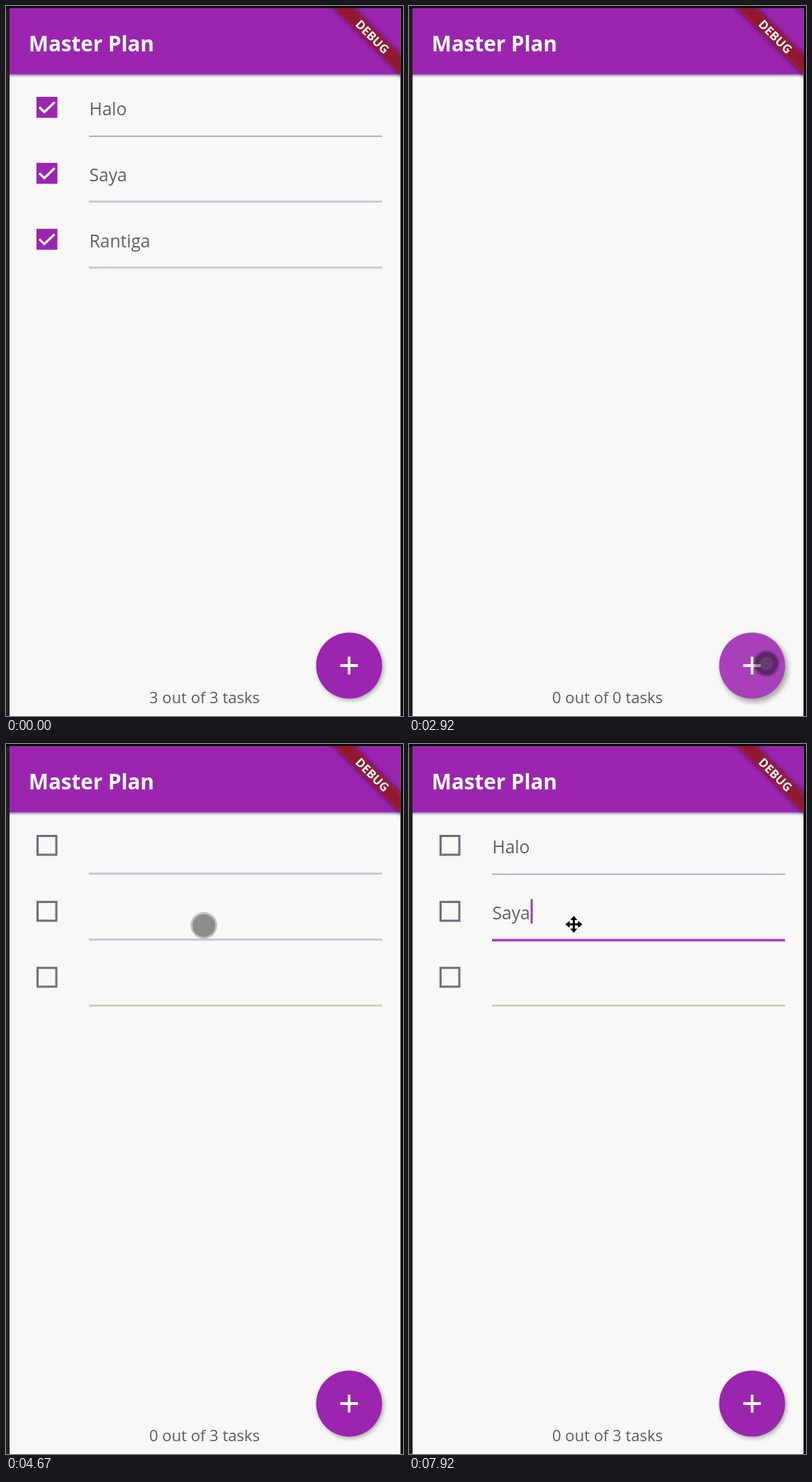
Write an HTML page that moves like this. It is 560 px wide and 1000 px high and loops after 8000 ms.

```html
<!DOCTYPE html>
<html lang="en">
<head>
<meta charset="utf-8">
<title>Task list</title>
<style>
  html, body { margin: 0; width: 100%; height: 100%; overflow: hidden; background: #000; }
  svg { display: block; width: 100vw; height: 100vh; }
  text { font-family: "Open Sans", "Noto Sans", sans-serif; }
  .item { font-size: 24.6px; fill: #626262; }
  .banner { font: 900 17px "Noto Sans", "Open Sans", sans-serif; }
</style>
</head>
<body>
<svg viewBox="0 0 560 1000" xmlns="http://www.w3.org/2000/svg">
  <defs>
    <clipPath id="app"><rect x="5" y="3" width="551.5" height="997"/></clipPath>
    <clipPath id="disc"><circle cx="484" cy="929" r="46.5"/></clipPath>
    <filter id="soft" x="-30%" y="-80%" width="160%" height="260%"><feGaussianBlur stdDeviation="3.5"/></filter>
    <filter id="thin" x="-5%" y="-10%" width="110%" height="120%"><feGaussianBlur stdDeviation="1.6"/></filter>
  </defs>
  <rect width="560" height="1000" fill="#050505"/>
  <rect y="4" width="5" height="996" fill="#202020"/>
  <g clip-path="url(#app)">
    <rect x="5" y="3" width="552" height="997" fill="#f8f8f7"/>
    <rect x="0" y="60" width="562" height="38.5" fill="#3a2c78" opacity=".5" filter="url(#thin)"/>
    <rect x="5" y="3" width="552" height="93.3" fill="#9b25af"/>
    <text x="32" y="64" font-size="29.6" font-weight="700" fill="#fff">Master Plan</text>
    <g transform="translate(556.5 3.5) rotate(45)">
      <rect x="-80" y="46.3" width="160" height="19.9" fill="#000" opacity=".5" filter="url(#soft)"/>
      <rect x="-80" y="46.3" width="160" height="19.9" fill="#b71c1c" opacity=".63"/>
      <text y="62.4" class="banner" fill="#fff" text-anchor="middle">DEBUG</text>
    </g>
    <g id="list"></g>
    <text id="status" x="280" y="982" font-size="22" fill="#5c5c5c" text-anchor="middle"></text>
    <circle id="shade" r="46" filter="url(#soft)"/>
    <circle id="fab" cx="484" cy="929" r="46.5" fill="#9b25af"/>
    <g clip-path="url(#disc)">
      <circle id="hover" cx="484" cy="929" r="47" fill="#fff"/>
      <circle id="ripple" fill="#fff"/>
    </g>
    <path d="M471.6 929H496.4M484 916.6V941.4" stroke="#fff" stroke-width="3.8"/>
    <g id="touch">
      <circle r="18.8" opacity=".22"/>
      <circle r="16" opacity=".28"/>
    </g>
    <path id="mover" d="M0-12L5-6H1.5V-1.5H6V-5L12 0L6 5V1.5H1.5V6H5L0 12L-5 6H-1.5V1.5H-6V5L-12 0L-6-5V-1.5H-1.5V-6H-5Z"
      stroke="#fff" stroke-width="1.6" paint-order="stroke"/>
  </g>
</svg>
<script>
const LOOP = 8000, STEP = 1000 / 12, PITCH = 92.9, TEXT_X = 117.5;
const CLEARED = 80, ADDED = [3000, 3580, 4160];
const TAPS = [
  { at: 2880, x: 504, y: 926 },
  { at: 3490, x: 492, y: 943 },
  { at: 4140, x: 490, y: 945 }
];
const PATH = [
  [2330, 580, 972], [2830, 504, 926], [3000, 504, 926], [3500, 490, 945], [4000, 490, 945],
  [4166, 375, 835], [4830, 262, 152], [6400, 262, 152], [6920, 233, 258], [7400, 233, 258]
];
const ITEMS = [
  { final: "Halo", typed: [[5580, "H"], [5830, "Ha"], [6000, "Hal"], [6160, "Halo"]], caret: [5000, 7070], line: [5080, 7160] },
  { final: "Saya", typed: [[7580, "S"], [7740, "Sa"], [7910, "Saya"]], caret: [7070, LOOP], line: [7160, LOOP] },
  { final: "Rantiga", typed: [], caret: [LOOP, LOOP], line: [LOOP, LOOP] }
];

const $ = id => document.getElementById(id);
const set = (el, attrs) => { for (const k in attrs) el.setAttribute(k, attrs[k]); };
const show = (el, on) => set(el, { visibility: on ? "visible" : "hidden" });
const within = (t, [from, to]) => t >= from && t < to;
const clamp = v => Math.max(0, Math.min(1, v));

function add(parent, tag, attrs) {
  const el = document.createElementNS("http://www.w3.org/2000/svg", tag);
  set(el, attrs);
  return parent.appendChild(el);
}

const rows = ITEMS.map((item, i) => {
  const g = add($("list"), "g", { transform: `translate(0 ${i * PITCH})` });
  return {
    item, g,
    box: add(g, "rect", { x: 44.5, y: 129.5, width: 26.5, height: 26.5, "stroke-width": 3 }),
    check: add(g, "path", { d: "M47 142.5L54 149.5L68.5 135.5", fill: "none", stroke: "#fff", "stroke-width": 3.2 }),
    text: add(g, "text", { x: TEXT_X, y: 154.3, class: "item" }),
    line: add(g, "rect", { x: 117, width: 413.5 }),
    caret: add(g, "rect", { y: 125.5, width: 3, height: 34.5, fill: "#a436bd" })
  };
});

function drawRow(row, i, t) {
  const { item } = row, done = t < CLEARED;
  const shown = done || t >= ADDED[i];
  set(row.g, { display: shown ? "inline" : "none" });
  if (!shown) return;

  set(row.box, { fill: done ? "#9b25af" : "none", stroke: done ? "#9b25af" : i < 2 ? "#716b82" : "#73726f" });
  set(row.check, { display: done ? "inline" : "none" });

  let label = done ? item.final : "";
  if (!done) for (const [at, s] of item.typed) if (t >= at) label = s;
  row.text.textContent = label;

  const focused = within(t, item.line);
  const settled = i === 0 && (done || t >= item.line[1]);
  const [y, height, fill] = focused ? [181.6, 3.6, "#a83cc2"]
    : settled ? [182.6, 1.6, "#a298b4"]
    : [181.3, 2.6, i < 2 ? "#c5c1d5" : "#cacabb"];
  set(row.line, { y, height, fill });

  const caretOn = within(t, item.caret);
  set(row.caret, { display: caretOn ? "inline" : "none" });
  if (caretOn) set(row.caret, { x: TEXT_X + (label ? row.text.getComputedTextLength() + .8 : 0) });
}

function pointer(t) {
  const next = PATH.findIndex(p => p[0] > t);
  if (next < 1) return null;
  const [t0, x0, y0] = PATH[next - 1], [t1, x1, y1] = PATH[next];
  const u = (t - t0) / (t1 - t0), e = u * u * (3 - 2 * u);
  return { x: x0 + (x1 - x0) * e, y: y0 + (y1 - y0) * e };
}

function draw(now) {
  const t = Math.floor((now % LOOP + 4) / STEP) * STEP;
  rows.forEach((row, i) => drawRow(row, i, t));

  const total = t < CLEARED ? 3 : ADDED.filter(at => t >= at).length;
  $("status").textContent = `${t < CLEARED ? 3 : 0} out of ${total} tasks`;

  const hover = clamp((t - 2740) / 120) * clamp((4330 - t) / 120);
  set($("hover"), { opacity: .13 * hover });
  set($("shade"), { opacity: .36 - .04 * hover, cx: 486 + hover, cy: 931.5 + 1.5 * hover, r: 46 + 1.5 * hover });

  const tap = TAPS.filter(p => t >= p.at).pop();
  const age = tap ? (t - tap.at) / 420 : 1;
  show($("ripple"), age < 1);
  if (age < 1) set($("ripple"), { cx: tap.x, cy: tap.y, r: 8 + 85 * age * age + 8 * age, opacity: .22 * Math.min(1, 2 - 2 * age) });

  const p = pointer(t);
  show($("touch"), !!p);
  if (p) set($("touch"), { transform: `translate(${p.x} ${p.y})` });
  show($("mover"), t >= 7400);
  set($("mover"), { transform: "translate(232.5 254)" });
}

const start = performance.now();
function tick() {
  draw(performance.now() - start);
  requestAnimationFrame(tick);
}
tick();
</script>
</body>
</html>
```
